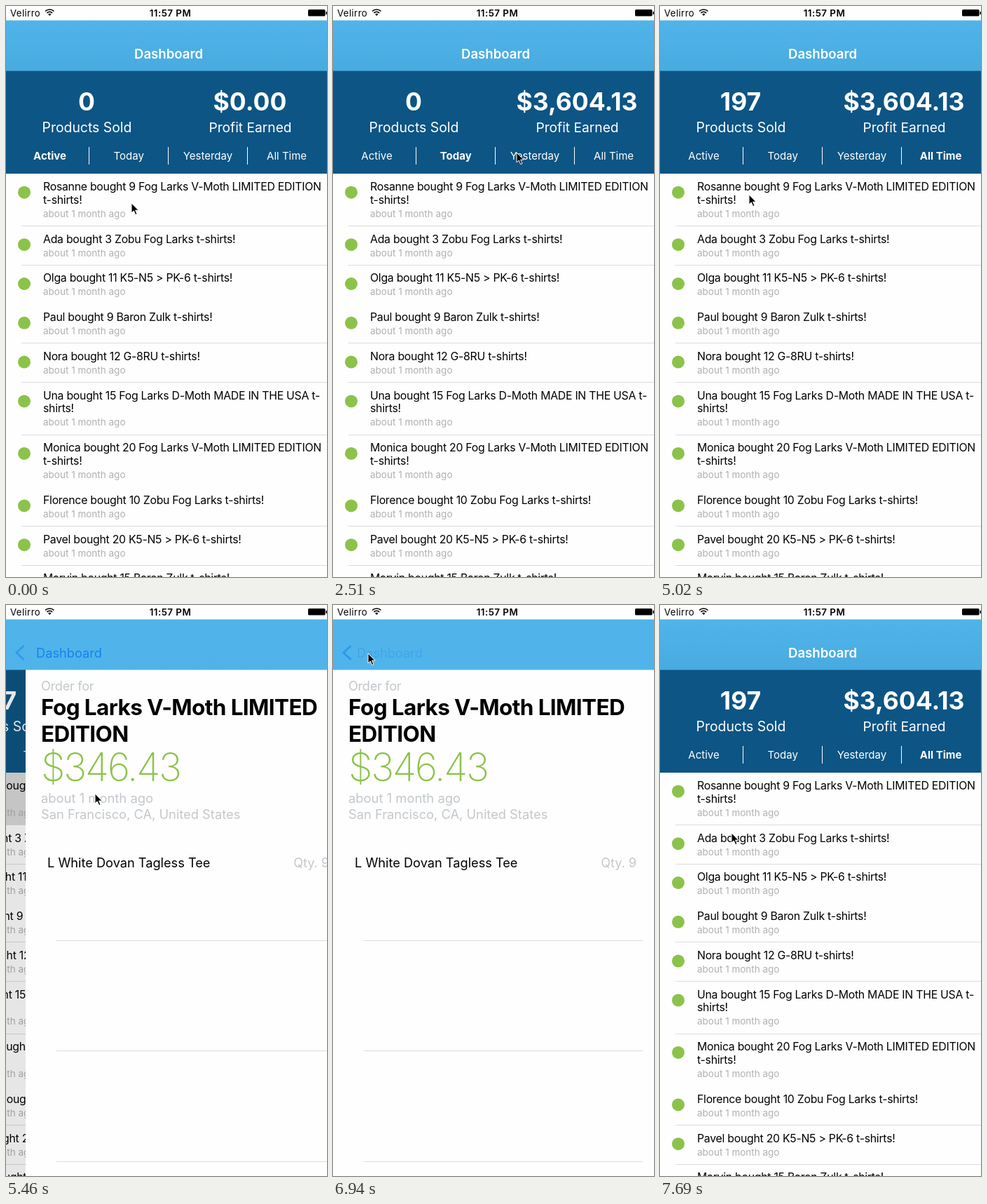
An HTML page that plays this animation: 458 by 814 pixels, repeating every 7990 ms.

```html
<!DOCTYPE html>
<html lang="en">
<head>
<meta charset="utf-8">
<title>Sales dashboard</title>
<style>
html, body { margin: 0; width: 100%; height: 100%; overflow: hidden; background: #fff; }
svg { display: block; width: 458px; height: 814px; font-family: Inter, Roboto, sans-serif; }
</style>
</head>
<body>
<svg viewBox="0 0 458 814">
  <defs>
    <linearGradient id="shade" x2="0" y2="1">
      <stop offset="0" stop-color="#2a86b8" stop-opacity="0"/>
      <stop offset="1" stop-color="#2a86b8" stop-opacity=".2"/>
    </linearGradient>
  </defs>
  <rect width="458" height="814" fill="#fefefe"/>
  <g id="dash"></g>
  <rect id="dim" y="92" width="458" height="722"/>
  <g id="detail"></g>
  <rect y="20.5" width="458" height="72" fill="#50b4ea"/>
  <rect id="glow" y="20.5" width="458" height="72" fill="url(#shade)"/>
  <path id="chevron" d="M25.5 58 15 68l10.500 10" fill="none" stroke="#0a7cf5" stroke-width="2.800"/>
  <g id="nav"></g>
  <g id="status">
    <path d="M56 7.500a9 9 0 0 1 12.500 0M58.300 10a5.800 5.800 0 0 1 7.900 0" fill="none" stroke="#000" stroke-width="1.700"/>
    <path d="M62.250 14l-2.200-2.300a3.200 3.200 0 0 1 4.400 0z"/>
    <rect x="431" y="5" width="24.500" height="9.500" rx="1.500"/>
    <path d="M456.500 8h1.500v4h-1.500z"/>
  </g>
  <path id="cursor" d="M0 0v14l3.300-3 2.400 5.600 2.300-1-2.400-5.400h4.400z" stroke="#fff"/>
</svg>
<script>
const $ = id => document.getElementById(id);
const FRAME = 147.95, COUNT = 54, W = 458;

function add(parent, tag, attrs) {
  const el = document.createElementNS('http://www.w3.org/2000/svg', tag);
  for (const k in attrs) el.setAttribute(k, attrs[k]);
  return $(parent).appendChild(el);
}
function text(parent, str, x, y, size, fill = '#000', weight = 400, anchor = 'start', gap = 0) {
  const el = add(parent, 'text', { x, y, fill, 'font-size': size, 'font-weight': weight,
    'text-anchor': anchor, 'letter-spacing': gap });
  el.textContent = str;
  return el;
}
const line = (parent, x, y, width) => add(parent, 'rect', { x, y, width, height: 1, fill: '#dcdcde' });

// Dashboard
add('dash', 'rect', { y: 92, width: W, height: 147, fill: '#0d5584' });
const sold = text('dash', '', 115, 149, 35.5, '#fff', 650, 'middle');
const profit = text('dash', '', 348, 149, 35.5, '#fff', 650, 'middle');
text('dash', 'Products Sold', 115.5, 180, 19.4, '#fff', 400, 'middle');
text('dash', 'Profit Earned', 348.5, 180, 19.2, '#fff', 400, 'middle');
const tabs = ['Active', 'Today', 'Yesterday', 'All Time'].map((name, i) => {
  if (i) add('dash', 'rect', { x: 5 + 113 * i, y: 201, width: 1, height: 25, fill: '#fff' });
  return text('dash', name, 62.5 + 112.7 * i, 219, 15, '#fff', 400, 'middle');
});
const picked = add('dash', 'rect', { y: 239, width: W, height: 74.5, fill: '#d9d9d9' });

const orders = [
  ['Rosanne bought 9 Fog Larks V-Moth LIMITED EDITION', 't-shirts!'],
  ['Ada bought 3 Zobu Fog Larks t-shirts!'],
  ['Olga bought 11 K5-N5 > PK-6 t-shirts!'],
  ['Paul bought 9 Baron Zulk t-shirts!'],
  ['Nora bought 12 G-8RU t-shirts!'],
  ['Una bought 15 Fog Larks D-Moth MADE IN THE USA t-', 'shirts!'],
  ['Monica bought 20 Fog Larks V-Moth LIMITED EDITION', 't-shirts!'],
  ['Florence bought 10 Zobu Fog Larks t-shirts!'],
  ['Pavel bought 20 K5-N5 > PK-6 t-shirts!'],
  ['Marvin bought 15 Baron Zulk t-shirts!']
];
let rowTop = 239;
orders.forEach((lines, i) => {
  add('dash', 'circle', { cx: 26, cy: rowTop + 26.7, r: 9, fill: '#8bc34a' });
  lines.forEach((s, j) =>
    text('dash', s, 53, rowTop + 24 + 18.7 * j, 15.8, '#000', 400, 'start', -.25));
  const extra = 18.7 * (lines.length - 1);
  text('dash', 'about 1 month ago', 53, rowTop + 43 + extra, 13.5, '#b0b0b0');
  rowTop += 55.8 + extra;
  if (i != 2 && i != 6) line('dash', 22, Math.floor(rowTop), W + 140);
});

// Order detail
add('detail', 'rect', { y: 92, width: W, height: 722, fill: '#fefefe' });
const grey = '#c3c8cc';
text('detail', 'Order for', 22, 122, 18.2, grey, 400, 'start', -.3);
text('detail', 'Fog Larks V-Moth LIMITED', 22, 157, 31.5, '#000', 700, 'start', -.6);
text('detail', 'EDITION', 22, 194.5, 31.5, '#000', 700, 'start', -.6);
text('detail', '$346.43', 22, 251, 55.5, '#8bc34a', 200, 'start', -2.2);
text('detail', 'about 1 month ago', 22, 282, 18.4, grey);
text('detail', 'San Francisco, CA, United States', 22, 305, 18.3, grey);
text('detail', 'L White Dovan Tagless Tee', 31, 374, 18.2);
text('detail', 'Qty. 9', 433, 374, 18, grey, 400, 'end');
for (const y of [478, 635, 793]) line('detail', 43.5, y, 399);

// Bars
const title = text('nav', 'Dashboard', 183, 75, 18.6, '#fff', 600);
const back = text('nav', 'Dashboard', 183, 75, 18.2, '#0a7cf5');
text('status', 'Velirro', 6, 14.5, 13.2, '#000', 400, 'start', .4);
text('status', '11:57 PM', 234.5, 14.5, 13.4, '#000', 600, 'middle', .45);

// Pointer stops: step, x, y
const path = [
  [0, 179, 281], [3, 129, 277], [4, 129, 277], [5, 130, 275], [8, 148, 392], [9, 148, 392],
  [12, 167, 192], [14, 168, 193], [15, 172, 205], [17, 262, 209], [20, 262, 209], [24, 387, 217],
  [26, 387, 217], [31, 135, 274], [33, 127, 269], [42, 127, 269], [46, 50, 69], [48, 50, 69],
  [49, 52, 72], [52, 102, 325], [54, 102, 325]
];
function pointer(n) {
  const i = path.findIndex(p => p[0] > n);
  const [a, x, y] = path[i - 1], [b, x2, y2] = path[i];
  const f = (n - a) / (b - a), e = f * f * (3 - 2 * f);
  return `translate(${x + (x2 - x) * e} ${y + (y2 - y) * e})`;
}
// Critically damped slide
const spring = f => f < 0 ? 0 : 1 - (1 + 2.5 * f) * Math.exp(-2.5 * f);

function draw(now) {
  const n = Math.floor((now % 7990 + 15) / FRAME) % COUNT;
  const p = spring(n - 35.2) - spring(n - 47.1);
  const tab = n < 15 ? 0 : n < 20 ? 1 : n < 26 ? 2 : 3;
  tabs.forEach((el, i) => el.setAttribute('font-weight', i == tab ? 650 : 400));
  sold.textContent = tab == 3 ? '197' : '0';
  profit.textContent = tab % 2 ? '$3,604.13' : '$0.00';

  const fade = (el, v) => el.setAttribute('opacity', v);
  const slide = (el, x) => el.setAttribute('transform', `translate(${x} 0)`);
  const pressed = n == 46 || n == 47;
  slide($('dash'), -.3 * W * p);
  slide($('detail'), W * (1 - p));
  slide($('nav'), -149 * p);
  fade($('dim'), .1 * p);
  fade($('glow'), 1 - p);
  fade($('chevron'), pressed ? .5 : p ** 8 * .75);
  fade(title, (1 - p) ** 1.5);
  fade(back, pressed ? .25 : p ** 2);
  fade(picked, n < 35 ? 0 : n < 47 ? 1 : p);
  $('cursor').setAttribute('transform', pointer(n));
}
const start = performance.now();
(function loop() {
  draw(performance.now() - start);
  requestAnimationFrame(loop);
})();
</script>
</body>
</html>
```
